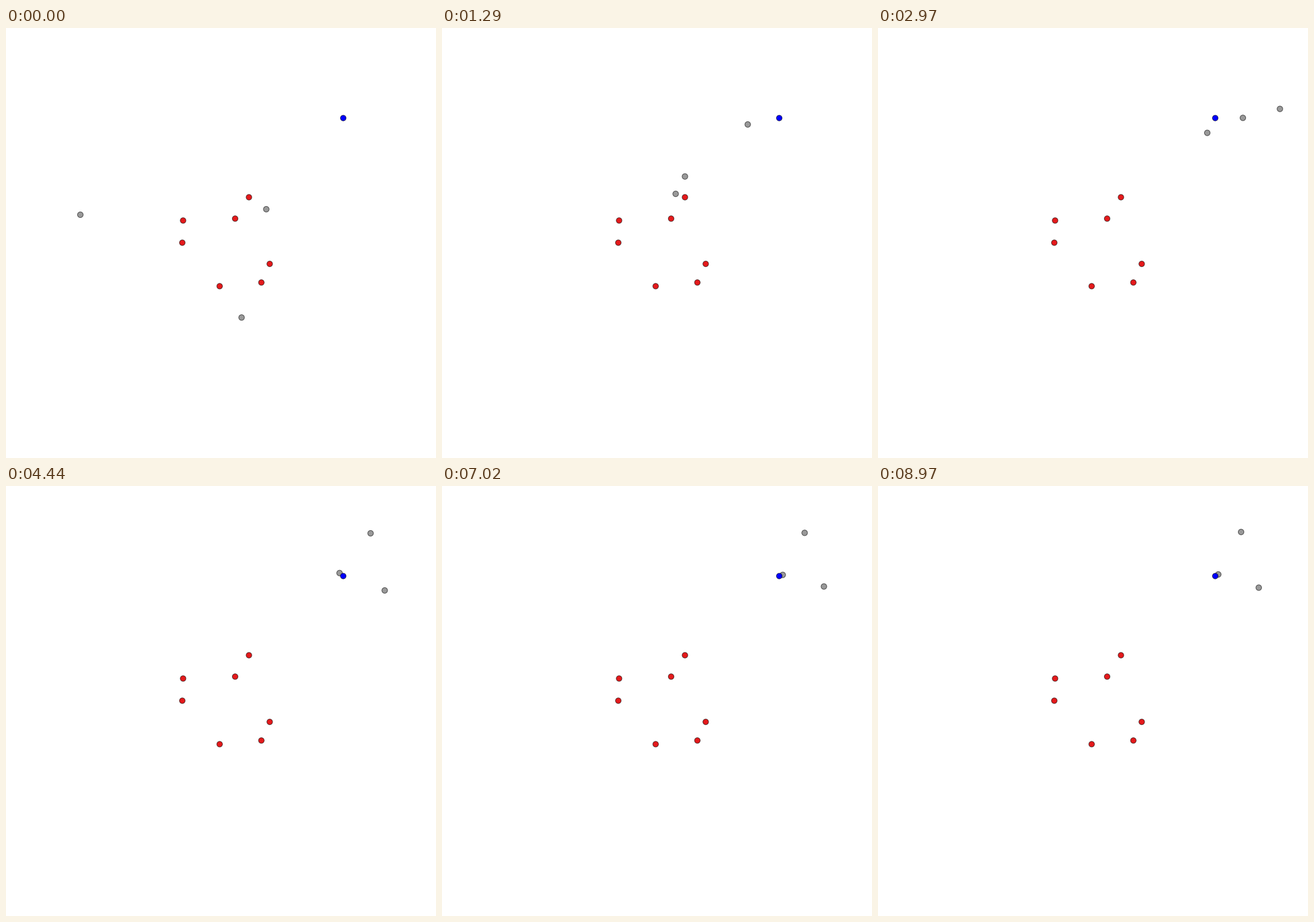
These frames come from a looping animation (700 px wide and 700 px high, 9 s). A matplotlib script:

```python
import numpy as np
import matplotlib.pyplot as plt
from matplotlib.animation import FuncAnimation
from matplotlib.patches import Circle

SIZE, DPI = 700, 100
FRAMES, INTERVAL = 300, 30
DECAY, PERIOD = 35, 102

GOAL = (549, 146.6)
OBSTACLES = [(288.3, 313.4), (287, 349.5), (373, 310.3), (395.5, 275.5),
             (429.3, 384), (415.7, 414.3), (347.8, 420.3)]

# Each agent flies through a few turning points, then swings to rest
TURNS = np.array([0, 43, 62, 99, 124, 148, 183])
AGENTS = [
    ([(121, 304), (395.5, 241.7), (516, 185), (594, 146.3),
      (595, 78), (593.5, 77), (593.8, 69.5)], (591, 75)),
    ([(423.7, 295), (497.7, 157), (617, 120), (654.3, 131.7),
      (628, 175), (616.5, 170), (612.6, 172.7)], (620, 165.3)),
    ([(383.5, 471.3), (380.4, 270), (485, 204), (536, 170.7),
      (543, 143), (543, 141.7), (551, 141)], (554, 144)),
]


class Track:
    def __init__(self, points, rest):
        self.p, self.rest = np.array(points, float), np.array(rest, float)
        h = np.diff(TURNS)[:, None]
        d = np.diff(self.p, axis=0) / h
        self.m = np.zeros_like(self.p)
        self.m[1:-1] = (d[:-1] * h[1:] + d[1:] * h[:-1]) / (h[1:] + h[:-1])

    def at(self, t):
        late = t - TURNS[-1]
        if late >= 0:
            swing = np.exp(-late / DECAY) * np.cos(2 * np.pi * late / PERIOD)
            return self.rest + (self.p[-1] - self.rest) * swing
        i = np.searchsorted(TURNS, t, side="right") - 1
        h = TURNS[i + 1] - TURNS[i]
        u = (t - TURNS[i]) / h
        ease = u * u * (3 - 2 * u)
        bend = h * u * (1 - u) * (self.m[i] * (1 - u) - self.m[i + 1] * u)
        return self.p[i] * (1 - ease) + self.p[i + 1] * ease + bend


fig = plt.figure(figsize=(SIZE / DPI, SIZE / DPI), dpi=DPI, facecolor="white")
ax = fig.add_axes([0, 0, 1, 1])
ax.set_xlim(0, SIZE)
ax.set_ylim(SIZE, 0)
ax.axis("off")


def dot(center, color, z):
    return ax.add_patch(Circle(center, 4.6, facecolor=color, edgecolor=(0, 0, 0, 0.6),
                               linewidth=72 / DPI, zorder=z))


tracks = [Track(*agent) for agent in AGENTS]
dots = [dot(track.at(0), "#999999", 1) for track in tracks]
for spot in OBSTACLES:
    dot(spot, "#e41a1c", 2)
dot(GOAL, "#0000ff", 3)


def update(frame):
    for d, track in zip(dots, tracks):
        d.center = track.at(frame)
    return dots


anim = FuncAnimation(fig, update, frames=FRAMES, interval=INTERVAL,
                     repeat=True, repeat_delay=0)
plt.show()
```
